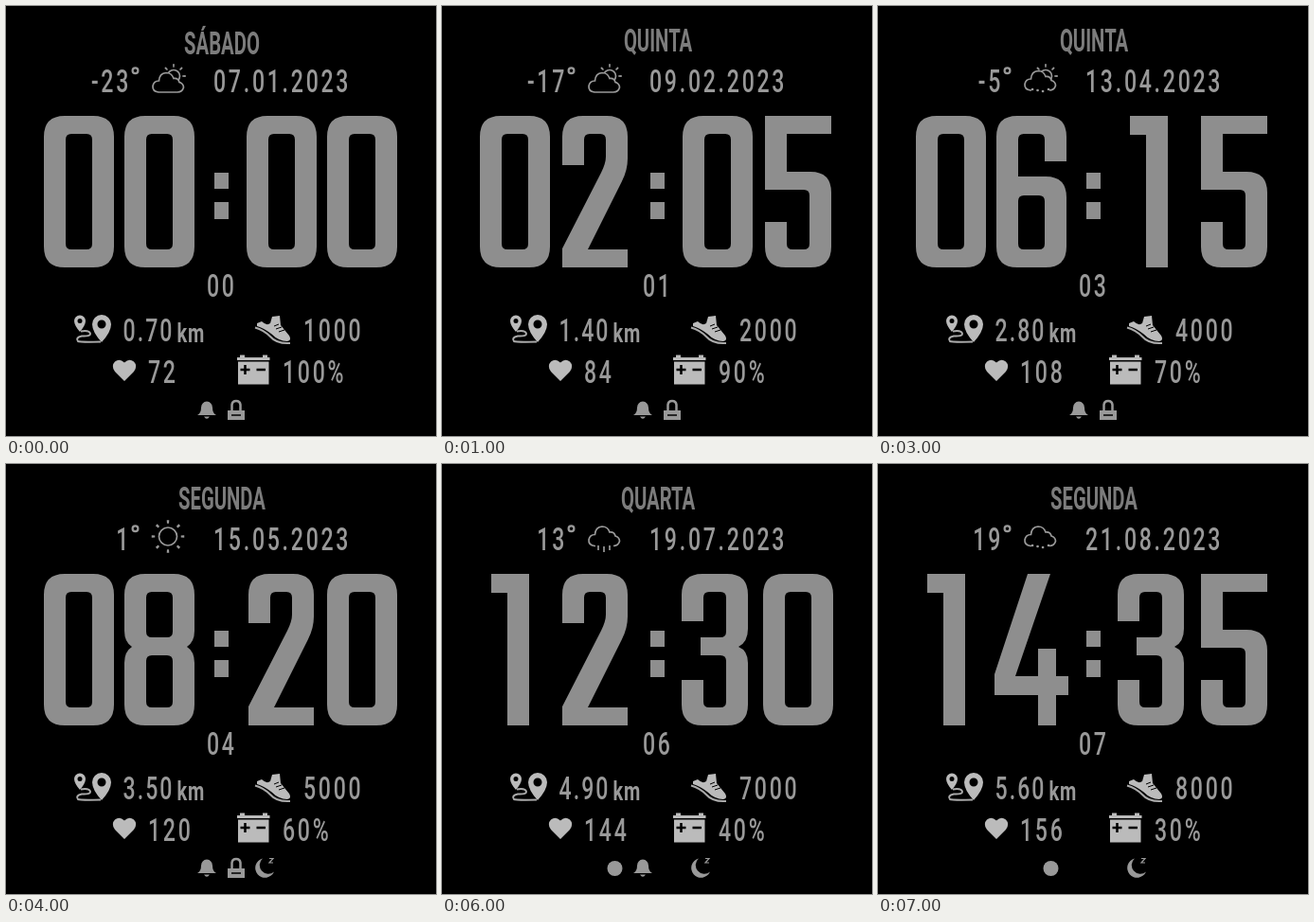
These frames come from a looping animation (454x454 px, 8000 ms). An HTML page:

```html
<!DOCTYPE html>
<html lang="pt">
<head>
<meta charset="utf-8">
<title>Watch face</title>
<style>
  html, body { margin: 0; width: 100%; height: 100%; overflow: hidden; background: #000; }
  svg { display: block; width: 454px; height: 454px; }
  text { font: 500 34px Roboto, sans-serif; letter-spacing: 4px; fill: #999; }
  #day { font-size: 33.5px; font-weight: 600; letter-spacing: 0; text-anchor: middle; fill: #7c7c7c; }
  #temp { text-anchor: end; }
  #dist { letter-spacing: 3px; }
  #unit { font-size: 27px; font-weight: 600; letter-spacing: 1px; }
  #time, #colon { fill: #8e8e8e; fill-rule: evenodd; }
  .line { fill: none; stroke: #999; stroke-width: 1.7; }
  .rays { stroke-dasharray: .2 .8; }
  .cut { fill: none; stroke: #000; }
</style>
</head>
<body>
<svg viewBox="0 0 454 454">
  <g id="labels"></g>
  <circle class="line" cx="136.500" cy="68.300" r="2.900" style="stroke-width:2.200"/>
  <g id="weather" class="line"></g>
  <g id="time"></g>
  <path id="colon" d="M220 176h15v17h-15zM220 207h15v18h-15z"/>

  <g id="route" fill="#bbb" fill-rule="evenodd">
    <path d="M78 344Q72 337 72 332.500A6 6 0 0 1 84 332.500Q84 337 78 344ZM80.500 332.500a2.500 2.500 0 1 0-5 0a2.500 2.500 0 1 0 5 0Z"/>
    <path d="M101 355Q91 344 91 336A10 10 0 0 1 111 336Q111 344 101 355ZM105.500 336a4.500 4.500 0 1 0-9 0a4.500 4.500 0 1 0 9 0Z"/>
    <path fill="none" stroke="#aaa" stroke-width="2" d="M79 343.500Q88 342 89 346Q89 349 80 348.500Q73 350 76 354Q78 355 100 354.500"/>
  </g>

  <g id="shoe">
    <path fill="#bbb" d="M265 335L270 333Q275 338 279 335L281 328L289 327L290 337L299 348Q302 353 297 354Q288 354 280 346Q272 340 265 338Z"/>
    <path fill="none" stroke="#aaa" stroke-width="2" d="M263 339.500Q272 342 279 349Q286 357 300 356"/>
    <path class="cut" d="M283 338l5-2M285 341l6-2M288 344l6-2"/>
  </g>

  <path fill="#bbb" d="M125 396L115 386Q110.500 380 115 375.500Q120 371.500 125 376.500Q130 371.500 135 375.500Q139.500 380 135 386Z"/>

  <g id="battery">
    <path fill="#bbb" d="M247 368.500h5v3h-5zM271 368.500h5v3h-5zM244 371h34.500v3h-34.500zM245 375.500h32.500v24h-32.500z"/>
    <path class="cut" stroke-width="2.500" d="M247.500 384h10M252.500 379v10M264.500 384h9.500"/>
  </g>

  <g fill="#999">
    <circle id="link" cx="182.500" cy="427" r="8"/>
    <path id="bell" d="M202 432Q206 430 206 424Q206.500 418 212 417.500Q217.500 418 218 424Q218 430 222 432ZM209 433.500H215Q212 438 209 433.500Z"/>
    <g id="lock">
      <path d="M234 427h18v10h-18z"/>
      <path fill="none" stroke="#999" stroke-width="2.500" d="M238.500 428V421Q239 417 243 417Q247 417 247.500 421V428"/>
      <path class="cut" stroke-width="1.500" d="M238 432h10"/>
    </g>
    <g id="moon">
      <path d="M271 416.500A10.300 10.300 0 1 0 283 430.500A9 9 0 0 1 271 416.500Z"/>
      <path fill="none" stroke="#999" stroke-width="1.200" d="M278 416.500h4l-4 4.500h4"/>
    </g>
  </g>
</svg>

<script>
const $ = id => document.getElementById(id);
const pad = n => String(n).padStart(2, '0');

const DAYS = ['SÁBADO', 'QUINTA', 'SÁBADO', 'QUINTA', 'SEGUNDA', 'SÁBADO', 'QUARTA', 'SEGUNDA'];

const LABELS = { // x, baseline, condensing
  day: [228, 48, .605], temp: [132, 90.5, .68], date: [219, 90.5, .68], sec: [212, 307, .68],
  dist: [123.5, 354, .68], unit: [180.5, 354.5, .74], steps: [314, 354, .68],
  pulse: [150, 397.5, .68], power: [292, 397.5, .68]
};

// Rounded counter of a numeral, 28 wide, between two heights
const hole = (top, end) => `M23 ${top + 6}Q23 ${top} 29 ${top}H45Q51 ${top} 51 ${top + 6}` +
  `V${end - 6}Q51 ${end} 45 ${end}H29Q23 ${end} 23 ${end - 6}Z`;

const NUMERALS = {
  0: 'M0 22Q0 0 22 0H52Q74 0 74 22V138Q74 160 52 160H22Q0 160 0 138Z' + hole(19, 141),
  1: 'M12 0H52V160H29V20H12Z',
  2: 'M2 52V22Q2 0 24 0H49Q71 0 71 22V45Q71 57 65 69L29 141H71V160H2V140L43 60Q48 50 48 43V25Q48 19 42 19H31Q25 19 25 25V52Z',
  3: 'M-1 50V22Q-1 0 21 0H47Q69 0 69 22V58Q69 72 59 77Q69 81 69 94V138Q69 160 47 160H21Q-1 160 -1 138V112H22V135Q22 141 28 141H40Q46 141 46 135V92Q46 86 40 86H19V67H40Q46 67 46 61V25Q46 19 40 19H28Q22 19 22 25V50Z',
  4: 'M33 0H57L20 108H44V79H63V108H76V128H63V160H44V128H-2V106Z',
  5: 'M2 0H72V19H25V59H50Q72 59 72 81V138Q72 160 50 160H24Q2 160 2 138V112H25V135Q25 141 31 141H43Q49 141 49 135V84Q49 78 43 78H2Z',
  6: 'M74 48V22Q74 0 52 0H22Q0 0 0 22V138Q0 160 22 160H52Q74 160 74 138V86Q74 64 52 64H23V25Q23 19 29 19H45Q51 19 51 25V48Z' + hole(84, 141),
  8: 'M0 22Q0 0 22 0H52Q74 0 74 22V60Q74 72 66 77Q74 82 74 94V138Q74 160 52 160H22Q0 160 0 138V94Q0 82 8 77Q0 72 0 60Z' + hole(19, 67) + hole(86, 141)
};

const sun = (x, y, r, reach) => `<circle cx="${x}" cy="${y}" r="${r}"/>
  <circle class="rays" cx="${x}" cy="${y}" r="${reach}" pathLength="8" stroke-width="3.500"
    style="stroke-dashoffset:.1"/>`;
const cloud = y => `<path fill="#000" transform="translate(154 ${y})"
  d="M7 21Q.5 20 1 14.500Q2 9 7.500 9Q8 1 15 .5Q21 .5 23 6.500Q28 6 29 10.500Q33.500 12 33.500 16Q32 21 27 21Z"/>`;
const gap = y => `<path class="cut" stroke-width="4" d="M162 ${y}H181"/>`;
const rain = y => gap(y) + `<path d="M165 ${y - 1}v5M171 ${y}v6M177 ${y - 1}v5"/>`;
const snow = y => gap(y) + `<path stroke-width="2.600" stroke-linecap="round"
  d="M163 ${y - 1}h.1M168.500 ${y}h.1M174 ${y + 1}h.1M180 ${y - 1}h.1"/>`;

const partly = sun(177, 74, 6.5, 11);
const WEATHER = [
  partly + cloud(70), partly + cloud(70),
  partly + cloud(68) + rain(89), partly + cloud(68) + snow(89),
  sun(171, 76.5, 9.5, 15.5), cloud(67),
  cloud(65.5) + rain(87), cloud(65.5) + snow(87)
];

$('labels').innerHTML = Object.entries(LABELS).map(([id, [x, y, squeeze]]) =>
  `<text id="${id}" transform="translate(${x} ${y}) scale(${squeeze} 1)"></text>`).join('');

function show(step) {
  const values = {
    day: DAYS[step],
    temp: 6 * step - 23,
    date: `${pad(7 + 2 * step)}.${pad(step + 1)}.2023`,
    sec: pad(step),
    dist: (.7 * (step + 1)).toFixed(2),
    unit: 'km',
    steps: 1000 * (step + 1),
    pulse: 72 + 12 * step,
    power: 100 - 10 * step + '%'
  };
  for (const id in values) $(id).textContent = values[id];

  // The accented name sits lower
  $('day').setAttribute('y', DAYS[step] === 'SÁBADO' ? 3 : 0);

  const digits = pad(2 * step) + pad(5 * step);
  $('time').innerHTML = [40, 125, 254, 339].map((x, i) =>
    `<path transform="translate(${x} 116)" d="${NUMERALS[digits[i]]}"/>`).join('');
  $('weather').innerHTML = WEATHER[step];

  const visible = { link: step > 4, bell: step < 7, lock: step < 5, moon: step > 3 };
  for (const id in visible) $(id).style.display = visible[id] ? '' : 'none';
}

let current = -1;
function tick() {
  const step = Math.floor(performance.now() / 1000) % 8;
  if (step !== current) show(current = step);
  requestAnimationFrame(tick);
}
tick();
</script>
</body>
</html>
```
